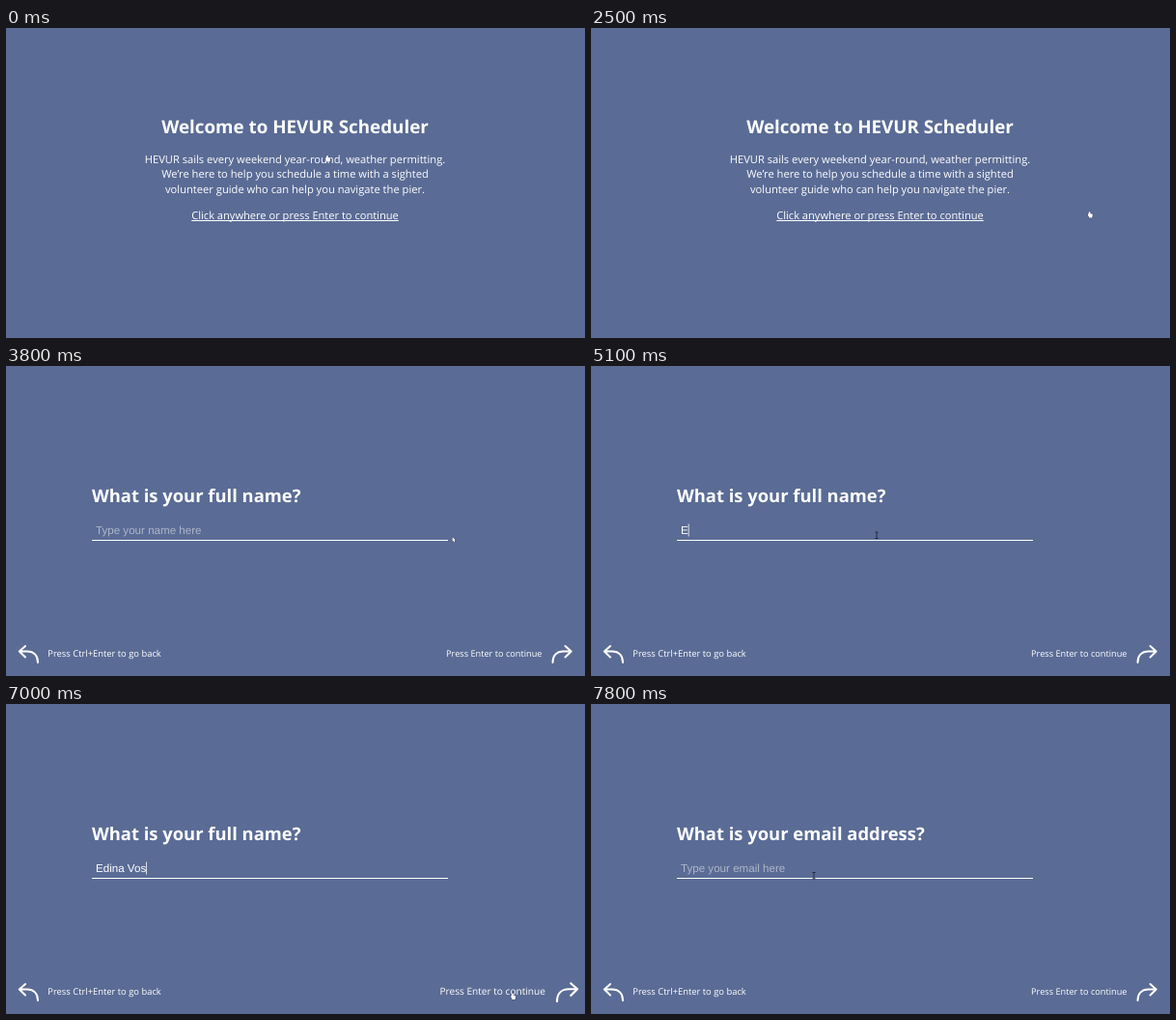
Recreate the animation shown at these times as an HTML page with a canvas. Size 600 by 321 pixels, loop 8 s.

```html
<!DOCTYPE html>
<html lang="en">
<head>
<meta charset="utf-8">
<title>Scheduler</title>
<style>
html, body { margin: 0; width: 100%; height: 100%; overflow: hidden; background: #5a6b95; }
canvas { display: block; width: 600px; height: 321px; }
</style>
</head>
<body>
<canvas id="stage" width="600" height="321"></canvas>
<script>
const ctx = document.getElementById('stage').getContext('2d');
const LOOP = 8000, STEP = 100;
const NAME_PAGE = 2800, EMAIL_PAGE = 7200;
const SANS = '"Open Sans", "Noto Sans", sans-serif';
const INPUT = '11.6px "Liberation Sans", Arial, sans-serif';
const NAME = 'Edina Vos';

// Pointer trips: start, end, and where each one arrives
const trips = [
  [600, 1100, 356, 144.5],
  [1100, 1300, 352.5, 145],
  [1700, 2100, 525, 194],
  [2300, 2900, 493, 177],
  [3700, 4100, 296, 175],
  [6400, 6600, 528, 311],
  [6600, 7000, 525, 299],
  [7300, 7800, 231, 177.5]
];

const ramp = (t, from, to) => Math.min(1, Math.max(0, (t - from) / (to - from)));
const smooth = p => p * p * (3 - 2 * p);
const fade = (t, start) => smooth(ramp(t, start - 100, start + 500));

function pointerAt(t) {
  let x = 333, y = 131.5;
  for (const [from, to, tx, ty] of trips) {
    const p = smooth(ramp(t, from, to));
    x += (tx - x) * p;
    y += (ty - y) * p;
  }
  return [x, y];
}

function pointerKind(t, x, y) {
  if (t < NAME_PAGE) return 'hand';
  if (x < 458 && y < 184) return 'beam';
  return x > 455 && y > 288 && y < 308 ? 'hand' : 'arrow';
}

function typedCount(t) {
  if (t < 5100) return 0;
  return 1 + Math.round(ramp(t, 5400, 6000) * (NAME.length - 1));
}

// The caret blinks from focus and stays lit while keys are pressed
function caretOn(t) {
  if (t < 3900 || t >= EMAIL_PAGE) return false;
  const since = t < 5100 ? 3850 : Math.min(t, 5800);
  return (t - since) % 950 < 475;
}

function hoverScale(t) {
  const grow = t < EMAIL_PAGE
    ? ramp(t, 6400, 6800)
    : Math.min(ramp(t, 7000, 7400), 1 - ramp(t, 7400, 7800));
  return 1 + 0.1 * grow;
}

function text(str, x, y, font, align = 'left') {
  ctx.font = font;
  ctx.textAlign = align;
  ctx.fillText(str, x, y);
}

function welcome() {
  const mid = 299.5;
  text('Welcome to HEVUR Scheduler', mid, 109, 'bold 18.8px ' + SANS, 'center');
  [
    'HEVUR sails every weekend year-round, weather permitting.',
    'We\u2019re here to help you schedule a time with a sighted',
    'volunteer guide who can help you navigate the pier.'
  ].forEach((line, i) => text(line, mid, 139.8 + i * 15.5, '11.17px ' + SANS, 'center'));
  const link = 'Click anywhere or press Enter to continue';
  text(link, mid, 198, '11.1px ' + SANS, 'center');
  const w = ctx.measureText(link).width;
  ctx.fillRect(mid - w / 2, 199, w, 1);
}

function backArrow() {
  ctx.lineWidth = 2;
  ctx.lineCap = ctx.lineJoin = 'round';
  ctx.beginPath();
  ctx.moveTo(20, 290);
  ctx.lineTo(13.8, 295.5);
  ctx.lineTo(20, 301.5);
  ctx.moveTo(13.8, 295.5);
  ctx.lineTo(22, 295.5);
  ctx.bezierCurveTo(29, 295.5, 33, 300, 33, 307);
  ctx.stroke();
}

function footer(scale) {
  backArrow();
  text('Press Ctrl+Enter to go back', 43.3, 301, '9.4px ' + SANS);
  ctx.save();
  ctx.translate(521.5, 298);
  ctx.scale(scale, scale);
  ctx.translate(-521.5, -298);
  text('Press Enter to continue', 555.5, 301, '9.2px ' + SANS, 'right');
  ctx.translate(599.5, 0);
  ctx.scale(-1, 1);
  backArrow();
  ctx.restore();
}

function question(t, title, hint, value, alpha) {
  ctx.globalAlpha = alpha;
  text(title, 89, 140.7, 'bold 18.4px ' + SANS);
  ctx.fillRect(89, 180, 369, 1);
  footer(hoverScale(t));
  if (!value) ctx.globalAlpha = alpha * 0.5;
  text(value || hint, 93, 174, INPUT);
  ctx.globalAlpha = 1;
  if (caretOn(t)) {
    ctx.fillRect(93 + ctx.measureText(value).width, 163.5, 0.8, 13);
  }
}

function poly(points) {
  ctx.beginPath();
  points.forEach(([x, y]) => ctx.lineTo(x, y));
  ctx.closePath();
  ctx.stroke();
  ctx.fill();
}

function drawPointer(kind, x, y) {
  ctx.save();
  ctx.translate(x, y);
  ctx.lineWidth = 0.7;
  ctx.lineJoin = 'round';
  ctx.strokeStyle = 'rgba(25, 30, 50, 0.65)';
  if (kind === 'beam') {
    ctx.fillStyle = '#20263c';
    ctx.fillRect(-0.45, -3, 0.9, 6.5);
    for (const end of [-3.4, 3]) ctx.fillRect(-1.6, end, 3.2, 0.9);
  } else if (kind === 'hand') {
    poly([[-0.6, 0.6], [0.6, 0.6], [0.8, 2.6], [3.2, 3.2], [2.6, 7], [-0.4, 7], [-1.8, 4.2]]);
  } else {
    poly([[0.4, 0.4], [0.4, 5], [1.4, 4.2], [2.2, 5.8], [3, 5.4], [2.4, 3.8], [3.7, 3.7]]);
  }
  ctx.restore();
}

function draw(now) {
  const t = Math.floor((now % LOOP) / STEP) * STEP;
  ctx.fillStyle = '#5a6b95';
  ctx.fillRect(0, 0, 600, 321);
  ctx.fillStyle = ctx.strokeStyle = '#fff';
  ctx.textRendering = 'geometricPrecision';
  if (t < NAME_PAGE) {
    welcome();
  } else if (t < EMAIL_PAGE) {
    question(t, 'What is your full name?', 'Type your name here',
      NAME.slice(0, typedCount(t)), fade(t, NAME_PAGE));
  } else {
    question(t, 'What is your email address?', 'Type your email here', '', fade(t, EMAIL_PAGE));
  }
  const [x, y] = pointerAt(t);
  drawPointer(pointerKind(t, x, y), x, y);
}

const start = performance.now();
function tick() {
  draw(performance.now() - start);
  requestAnimationFrame(tick);
}
tick();
</script>
</body>
</html>
```
